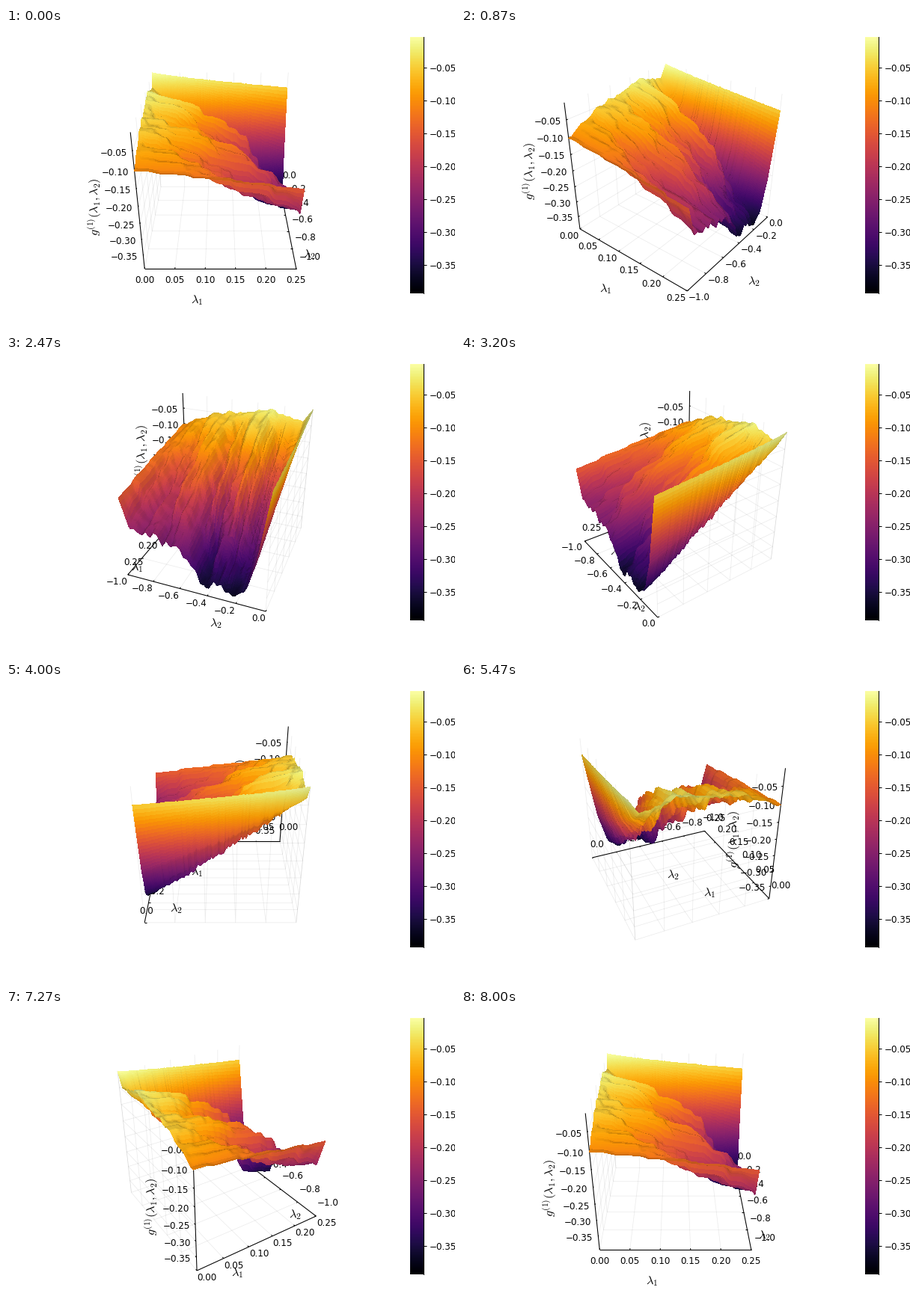
Animation, 600 px wide and 400 px high, one loop 8.07 s. Source, as a matplotlib script:

```python
import numpy as np
import matplotlib.pyplot as plt
from matplotlib.animation import FuncAnimation
from matplotlib.collections import LineCollection, QuadMesh

plt.rcParams["font.family"] = "DejaVu Sans"
plt.rcParams["mathtext.fontset"] = "cm"

LOOP, TURN_STEPS = 8070, 120
FRAMES = TURN_STEPS + 2          # the full turn is held until the loop ends
ZMIN, ZMAX = -0.3932, -0.0034
CX, CY, FOCAL, DIST = 286.5, 183.5, 640.7, 6.692
SIN_E, COS_E = 0.5, np.sqrt(0.75)
TICK, TICK_SIZE = 0.026, 8.6


# ---- surface in cube coordinates [-1, 1] ----
def spread(a, radius, sigma, axis):
    """Blur along one axis with a bell-shaped kernel."""
    return sum(np.exp(-.5 * (k / sigma) ** 2) * np.roll(a, k, axis)
               for k in range(-radius, radius + 1))


def edge_profile(rng, y, keys, rough):
    """Height along an edge: key points plus seeded ripples."""
    knots = np.linspace(-1, .8, 32)
    ripple = rng.normal(0, rough, knots.size)
    ripple[[0, -1]] = 0
    return np.interp(y, *np.transpose(keys)) + np.interp(y, knots, ripple)


def build_surface():
    rng = np.random.default_rng(5)
    x = np.linspace(-1, 1, 101)
    y = np.append(np.linspace(-1, .6, 80, endpoint=False),
                  np.linspace(.6, 1, 50))
    u = (x + 1) / 2
    high = edge_profile(rng, y, [(-1, .5), (-.4, .76), (.1, .85), (.4, .92),
                                 (.88, .8), (1, .995)], .018)
    low = edge_profile(rng, y, [(-1, .25), (-.89, -.14), (-.15, -.32),
                                (.17, -.88), (.3, -.7), (.52, -.97),
                                (.7, -.8), (.85, -.27), (1, .76)], .05)

    # every row falls from the high edge to the low one in random stairs
    jumps = rng.random((y.size, x.size - 1)) ** 60
    jumps = spread(spread(jumps, 4, 1.6, 0), 2, 1.1, 1) + .03
    fall = np.zeros((y.size, x.size))
    fall[:, 1:] = np.cumsum(jumps, 1) / jumps.sum(1, keepdims=True)
    fall **= 1.2

    # towards the far side the stairs turn into a smooth curtain
    smooth = np.clip((y - .5) / .25, 0, 1)[:, None]
    curtain = u ** .8 + rng.normal(0, .018, x.size) * np.sin(np.pi * u)
    fall += (curtain - fall) * smooth
    return (*np.meshgrid(x, y), high[:, None] + (low - high)[:, None] * fall)


def cell_mean(a):
    return (a[1:, 1:] + a[:-1, 1:] + a[1:, :-1] + a[:-1, :-1]) / 4


def cell_slope(a, b, axis):
    return (np.diff(cell_edges(a, 1 - axis), axis=axis)
            / np.diff(cell_edges(b, 1 - axis), axis=axis))


def cell_edges(a, axis):
    return (a[1:] + a[:-1]) / 2 if axis == 0 else (a[:, 1:] + a[:, :-1]) / 2


X, Y, Z = build_surface()
COLOR = plt.get_cmap("inferno")((cell_mean(Z) + 1) / 2)
ZX, ZY = cell_slope(Z, X, 1), cell_slope(Z, Y, 0)
NORM = np.sqrt(1 + ZX ** 2 + ZY ** 2)


def project(x, y, z, sa, ca):
    side = ca * x + sa * y
    near = sa * x - ca * y
    k = FOCAL / (DIST - COS_E * near - SIN_E * z)
    return np.stack([CX + k * side, CY - k * (COS_E * z - SIN_E * near)], -1)


def draw_surface(sa, ca):
    pts = project(X, Y, Z, sa, ca)
    facing = np.abs(-ZX * COS_E * sa + ZY * COS_E * ca + SIN_E) / NORM
    color = COLOR.copy()
    color[..., :3] *= (0.72 + 0.28 * np.minimum(1, 1.25 * facing))[..., None]
    # order the cells from far to near
    dy, dx = (1 if ca < 0 else -1), (1 if sa > 0 else -1)
    pts, color = pts[::dy, ::dx], color[::dy, ::dx]
    if abs(sa) > abs(ca):
        pts, color = pts.swapaxes(0, 1), color.swapaxes(0, 1)
    mesh = QuadMesh(np.ascontiguousarray(pts), antialiased=False,
                    facecolors=color.reshape(-1, 4), edgecolors="none",
                    linewidth=0, zorder=5)
    ax.add_collection(mesh, autolim=False)


# ---- axes: (value text, cube position) ----
def make_ticks(values, lo, hi, digits):
    return [(f"{v:.{digits}f}".replace("-", "\u2212"),
             2 * (v - lo) / (hi - lo) - 1) for v in values]


Z_VALUES = -.05 * np.arange(1, 8)
X_TICKS = make_ticks(.05 * np.arange(6), 0, .25, 2)
Y_TICKS = make_ticks(.2 * np.arange(-5, 1), -1, 0, 1)
Z_TICKS = make_ticks(Z_VALUES, ZMIN, ZMAX, 2)


def grid_and_ticks():
    lines, ticks = [], []
    for _, p in X_TICKS:
        lines.append([(p, -1, -1), (p, 1, -1), (p, 1, 1)])
        ticks.append([(p, -1, -1), (p, -1 + TICK, -1)])
    for _, p in Y_TICKS:
        lines.append([(1, p, -1), (-1, p, -1), (-1, p, 1)])
        ticks.append([(1, p, -1), (1 - TICK, p, -1)])
    for _, p in Z_TICKS:
        lines.append([(-1, -1, p), (-1, 1, p), (1, 1, p)])
        ticks.append([(-1, -1, p), (-1, -1 + TICK, p)])
    axes = [[(-1, -1, -1), (1, -1, -1)], [(1, -1, -1), (1, 1, -1)],
            [(-1, -1, -1), (-1, -1, 1)]]
    return np.array(lines, float), np.array(ticks + axes, float)


GRID_LINES, AXIS_LINES = grid_and_ticks()


def label(x, y, s, ha):
    ax.text(x, y, s, ha=ha, va="center_baseline", fontsize=TICK_SIZE, zorder=3)


def label_floor_axis(ticks, place, sa, ca):
    pts = [project(*place(p), sa, ca) for _, p in ticks]
    dx, dy = pts[1] - pts[0]
    phi = (np.degrees(np.arctan2(-dy, dx)) - 90) % 360
    c, s = np.cos(np.radians(phi)), np.sin(np.radians(phi))
    for (text, _), (x, y) in zip(ticks, pts):
        if abs(phi - 270) < 0.5:
            label(x, y + 14, text, "center")
            continue
        oy = -16 - 3.5 * s if phi < 180 else 5 - 3.5 * s
        if 180 <= phi < 270:
            label(x + 5 * c + .8, y + oy, text, "right")
        else:
            label(x + 5.3 * c - 1.7, y + oy, text, "left")


def title(pos, off, s, sa, ca, rot=0):
    x, y = project(*pos, sa, ca)
    ax.text(x + off[0], y + off[1], s, ha="center", va="center",
            rotation=rot, fontsize=11.8, zorder=3)


def draw_axes(sa, ca):
    for segs, color, width, order in ((GRID_LINES, (0, 0, 0, .08), .55, 1),
                                      (AXIS_LINES, "black", .75, 2)):
        flat = project(segs[..., 0], segs[..., 1], segs[..., 2], sa, ca)
        ax.add_collection(LineCollection(flat, colors=[color],
                                         linewidths=width, zorder=order),
                          autolim=False)
    label_floor_axis(X_TICKS, lambda p: (p, -1, -1), sa, ca)
    label_floor_axis(Y_TICKS, lambda p: (1, p, -1), sa, ca)
    for text, p in Z_TICKS:
        x, y = project(-1, -1, p, sa, ca)
        label(x - 7, y + .8, text, "right")
    title((0, -1, -1), (-31.5, 42), r"$\lambda_1$", sa, ca)
    title((1, 0, -1), (29.5, 42), r"$\lambda_2$", sa, ca)
    title((-1, -1, 0), (-57.5, 0.5), r"$g^{(1)}(\lambda_1,\lambda_2)$",
          sa, ca, 90)


fig = plt.figure(figsize=(6, 4), dpi=100, facecolor="white")
ax = fig.add_axes([0, 0, 1, 1])

bar = fig.add_axes([540 / 600, 45 / 400, 18 / 600, 343 / 400])
bar.imshow(np.linspace(1, 0, 343)[:, None], cmap="inferno", aspect="auto",
           extent=(0, 1, ZMIN, ZMAX))
bar.yaxis.tick_right()
bar.set_xticks([])
bar.set_yticks(Z_VALUES, [t for t, _ in Z_TICKS])
bar.tick_params(length=3.2, width=.75, pad=2.3, labelsize=TICK_SIZE)
for side in ("top", "left", "bottom"):
    bar.spines[side].set_visible(False)
bar.spines["right"].set_linewidth(.75)


def draw(i):
    step = min(i, TURN_STEPS) % TURN_STEPS
    angle = 2 * np.pi * step / TURN_STEPS
    sa, ca = np.sin(angle), np.cos(angle)
    ax.clear()
    ax.axis("off")
    ax.set_xlim(0, 600)
    ax.set_ylim(400, 0)
    draw_axes(sa, ca)
    draw_surface(sa, ca)
    return []


anim = FuncAnimation(fig, draw, frames=FRAMES, init_func=lambda: [],
                     interval=LOOP / FRAMES, repeat=True, repeat_delay=0)
plt.show()
```
